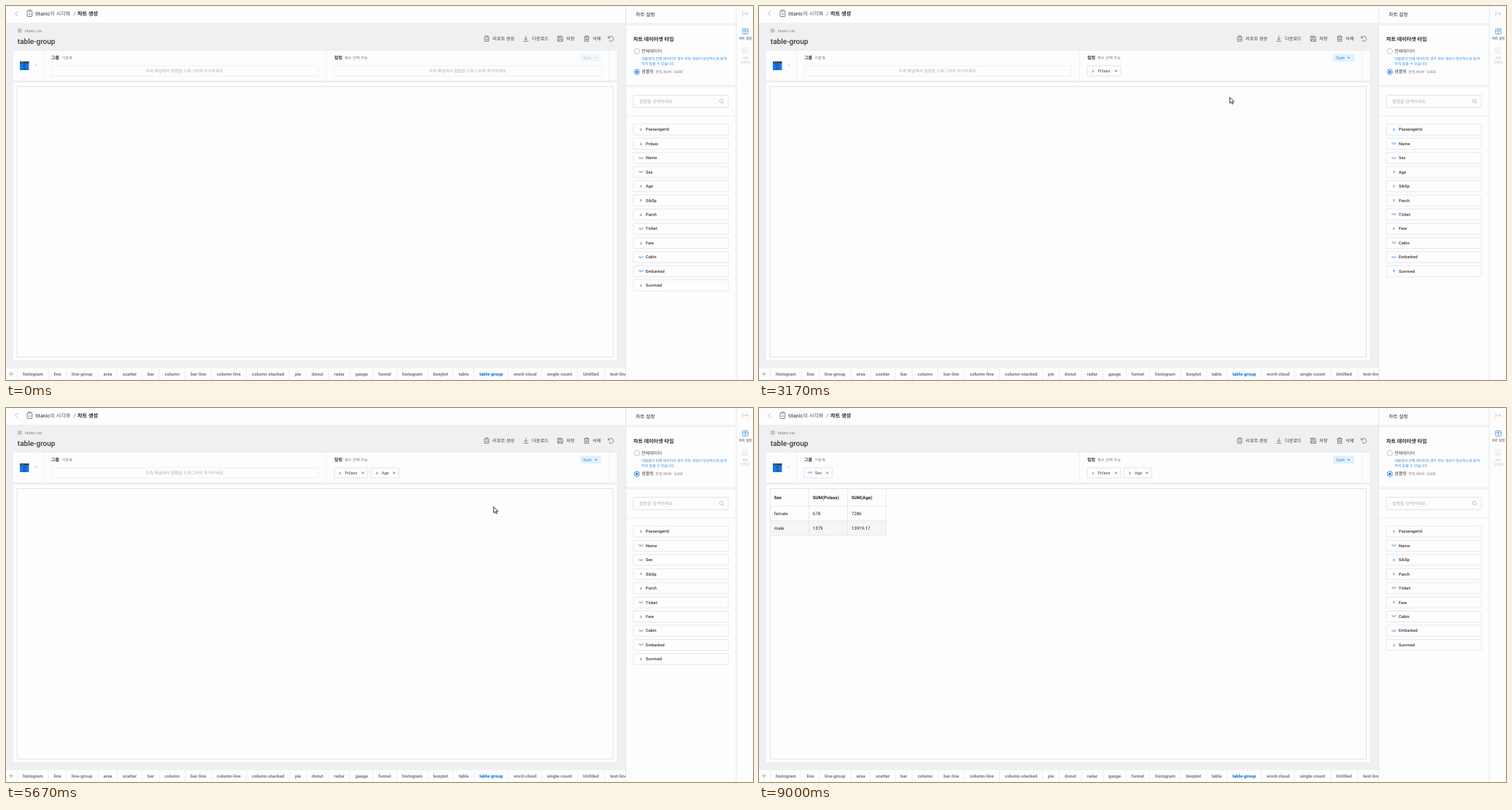
Animation of 1024 by 513 pixels, one loop 9.81 s. Source, as an HTML page:

```html
<!DOCTYPE html>
<html lang="ko">
<head>
<meta charset="utf-8">
<title>Chart builder</title>
<style>
  html, body { margin: 0; width: 100%; height: 100%; overflow: hidden; background: #fdfdfe; }
  svg { display: block; width: 100vw; height: 100vh; }
  text { font-family: Roboto, "Noto Sans CJK KR", "Noto Sans CJK", sans-serif; text-rendering: geometricPrecision; white-space: pre; }
</style>
</head>
<body>
<svg id="stage" viewBox="0 0 1024 513">
  <defs>
    <clipPath id="tabClip"><rect x="0" y="496" width="849" height="17"/></clipPath>
    <filter id="soft" x="-10%" y="-50%" width="120%" height="220%"><feGaussianBlur stdDeviation="1.3"/></filter>
  </defs>
  <g id="base"></g>
  <g id="state"></g>
  <g id="ghost"></g>
  <g id="arrow"><path d="M0 0V8.2L1.9 6.5 3.3 9.4 4.8 8.7 3.5 5.9H6.1Z" fill="#fff" stroke="#222" stroke-width=".9" stroke-linejoin="round"/></g>
  <g id="hand"><path d="M-3 1.6C-4 .4-3.6-.8-2.4-.6-2.5-2.4-1.2-2.8-.6-2.3 0-3 1-2.9 1.4-2.2 2.3-2.4 3.2-1.8 3.2-.6V.8L2.4 2.5H-2Z" fill="#fff" stroke="#222" stroke-width=".9" stroke-linejoin="round"/></g>
</svg>
<script>
const LOOP = 9810, BLUE = '#2a86db', LINE = '#e6e8ea', INK = '#3a3a3a', PAGE = '#eef0f2';
const $ = id => document.getElementById(id);

// Shape helpers; text is placed by its vertical centre.
const text = (x, cy, s, size, fill = INK, weight = 400, anchor = 'start') =>
  `<text x="${x}" y="${cy + size * .36}" font-size="${size}" fill="${fill}" font-weight="${weight}" text-anchor="${anchor}">${s}</text>`;
const rect = (x, y, w, h, fill = 'none', stroke = 'none', r = 0, sw = .7) =>
  `<rect x="${x}" y="${y}" width="${w}" height="${h}" rx="${r}" fill="${fill}" stroke="${stroke}" stroke-width="${sw}"/>`;
const path = (d, stroke = '#555', w = .8, fill = 'none') =>
  `<path d="${d}" fill="${fill}" stroke="${stroke}" stroke-width="${w}"/>`;
const at = (x, y, body) => `<g transform="translate(${x} ${y})">${body}</g>`;

const columns = [['PassengerId', 0], ['Pclass', 0], ['Name', 1], ['Sex', 1], ['Age', 0], ['SibSp', 0],
  ['Parch', 0], ['Ticket', 1], ['Fare', 0], ['Cabin', 1], ['Embarked', 1], ['Survived', 0]];
const tabs = [['histogram', 23], ['line', 65.5], ['line-group', 90], ['area', 133.5], ['scatter', 160], ['bar', 194],
  ['column', 217.5], ['bar-line', 253], ['column-line', 289], ['column-stacked', 337], ['pie', 396], ['donut', 419],
  ['radar', 449.5], ['gauge', 479], ['funnel', 510.5], ['histogram', 543], ['boxplot', 585.5], ['table', 620.5],
  ['table-group', 649], ['word-cloud', 696], ['single-count', 741.5], ['Untitled', 791], ['test-line', 828]];

const typeMark = (x, cy, isText) => isText
  ? text(x, cy, 'TXT', 3.5, BLUE, 700, 'middle')
  : text(x, cy, '3', 4.6, BLUE, 700, 'middle');

function drawBase() {
  let s = rect(0, 0, 1024, 513, '#fdfdfe') + rect(0, 23, 849, 473, PAGE);
  // breadcrumb
  s += path('M16 7L12.8 10.4 16 13.8', '#999', .7);
  s += rect(29, 6.5, 6.8, 8, 'none', '#666', .8, .8) + rect(30.8, 5.3, 3.2, 2, '#fdfdfe', '#666', .3) + path('M31 12V10.8M32.5 12V9.6M34 12V10.4', '#666', .6);
  s += text(40.3, 10.3, 'titanic의 시각화', 7.17, '#555', 500) + text(92.3, 10.3, '/', 7.17, '#666') + text(98, 10.3, '차트 생성', 7.17, '#222', 700);
  // heading
  s += rect(16.5, 31.5, 4.6, 4.6, 'none', '#999', .4, .6) + path('M16.5 33.1H21.1M16.5 34.6H21.1M18.7 31.5V36', '#999', .5);
  s += text(26, 34, 'titanic.csv', 5.2, '#777') + text(15.8, 48.2, 'table-group', 10.05, INK, 500);
  // toolbar
  s += rect(656, 42, 5.8, 6.4, 'none', '#555', .5, .7) + rect(657.4, 40.8, 3, 1.8, PAGE, '#555', .2, .6) + path('M657.5 46.8V45.5M659 46.8V44.2M660.4 46.8V45', '#555', .6);
  s += path('M712.7 41V46.5M710.2 44.2L712.7 46.7 715.2 44.2M709.3 48.3H716.1', '#555', .7);
  s += path('M756.4 41.4H761.8L763.2 42.8V48.3H756.4ZM758 41.4V43.5H761V41.4M757.8 48.3V45.6H761.8V48.3', '#555', .7);
  s += path('M792.3 42.3H799.5M794.4 42.2V41H797.4V42.2M793.3 42.4V48.4H798.5V42.4M795 44V47M796.8 44V47', '#555', .7);
  s += path('M826.2 43.5A3.4 3.4 0 1 1 826.5 47M825.7 41.2V44H828.5', '#555', .7);
  [[667, '리포트 생성'], [721, '다운로드'], [768, '저장'], [804, '삭제']].forEach(([x, w]) => s += text(x, 44.8, w, 6.2, INK, 500));
  // drop panel
  s += rect(9, 61, 829, 41.5, '#fdfdfe', LINE, 0, .6) + path('M51.5 61V102M439.2 61V102M827 61V102', LINE, .7);
  s += rect(19, 76, 12.4, 12, '#0f78f4') + rect(19, 76, 12.4, 2.8, '#3a4654');
  s += '<path d="M20.3 77.4H24" stroke="#9fb0c2" stroke-width=".7" stroke-dasharray=".8 .6"/>';
  s += path('M27.4 81.9V80.9H23.4L25.6 83.5 23.4 86.1H27.4V85.1', '#4a3a44', .9);
  s += '<path d="M39.4 80.6H42.4L40.9 82.3Z" fill="#bbb"/>';
  s += text(62, 71, '그룹', 6, INK, 700) + text(76.6, 71, '기준축', 5.2, '#777') + text(450, 71, '컬럼', 6, INK, 700) + text(464, 71, '복수 선택 가능', 5.3, '#777');
  // chart area
  s += rect(9, 104.5, 829, 382, '#fdfdfe', LINE, 0, .6) + rect(15.2, 110.4, 817.2, 371, 'none', '#e0dfe1', 0, .9);
  // tabs
  s += rect(0, 496, 849, 17, '#fdfdfe') + path('M0 496.3H849', LINE, .6) + path('M4 504.6H10.2M7.1 501.5V507.7', '#999', .7) + '<g clip-path="url(#tabClip)">';
  tabs.forEach(([name, x]) => {
    s += path(`M${x - 7.4} 497V513`, LINE, .7) + text(x, 504.7, name, 6.14, name === 'table-group' ? '#0a6fdc' : '#777', 700);
  });
  s += '</g>';
  // settings panel
  s += rect(849.5, 0, 151.5, 513, '#fdfdfe') + path('M849.5 0V513M1001 0V513', '#e0e3e6', .9);
  s += rect(850, 23.4, 151, 3, '#f0f1f3') + rect(850, 108.5, 151, 3, '#f0f1f3') + path('M850 151H1000', LINE, .7);
  s += text(863.3, 12, '차트 설정', 6.67, '#222', 500) + text(860, 45.4, '차트 데이터셋 타입', 7.05, '#222', 700);
  s += `<circle cx="864.8" cy="62" r="3.7" fill="#fff" stroke="#aaa" stroke-width=".7"/><circle cx="864.8" cy="90.4" r="3.6" fill="#fff" stroke="${BLUE}" stroke-width=".9"/><circle cx="864.8" cy="90.4" r="1.9" fill="${BLUE}"/>`;
  s += text(871, 61.8, '전체데이터', 6.1, '#444') + text(871, 90.2, '샘플링', 6.15, '#444') + text(890.3, 90.4, '한정, ROW : 5,000', 4.85, '#777');
  s += text(871.3, 72, '대용량의 전체 데이터의 경우 차트 생성이 정상적으로 동작', 4.92, '#2a88e2') + text(871.3, 79, '하지 않을 수 있습니다.', 4.95, '#2a88e2');
  s += rect(860, 122.4, 130, 17, '#fdfdfe', '#dadcdf', 1, .8) + text(868, 130.8, '컬럼을 검색하세요.', 5.98, '#b0b0b0');
  s += '<circle cx="980.6" cy="130.4" r="2.4" fill="none" stroke="#aaa" stroke-width=".7"/>' + path('M982.4 132.2L984.3 134.1', '#aaa', .7);
  // side rail
  s += path('M1010 7V13.6M1011.3 10.3H1017.2M1014.8 8L1017.2 10.3 1014.8 12.6', '#bbb', .7);
  s += rect(1009.7, 31.2, 7.4, 7.2, 'none', '#4a97df', .5, .8) + path('M1009.7 34H1017.1M1013.4 31.2V38.4', '#4a97df', .8) + text(1013.6, 44.6, '차트 설정', 4.55, INK, 500, 'middle');
  s += path('M1010 56.8V64.4H1017.4M1012 63V60.5M1014 63V59M1016 63V61M1012 58.5L1014 57 1016.8 57.6', '#d4d4d6', .7);
  s += text(1013.6, 71.3, '차트', 4.5, '#bbb', 400, 'middle') + text(1013.6, 77.6, '디자인', 4.5, '#bbb', 400, 'middle');
  $('base').innerHTML = s;
}

const cardShadow = '<rect x="1" y="5" width="128" height="11.5" fill="#9aa5b0" opacity=".25" filter="url(#soft)"/>';

// One field card, its top left corner at 0,0.
function card([name, isText], active) {
  return rect(0, 0, 130.3, 15, '#fdfdfe', active ? '#66a8e2' : '#e3e4e7', 1, active ? .9 : .8)
    + typeMark(10.5, 7.5, isText) + text(17.2, 7.4, name, 5.68, INK, 500)
    + (active ? '<path d="M120.6 5V11M122.4 5V11" stroke="#dcdee0" stroke-width=".7" stroke-dasharray=".8 1.2"/>' : '');
}

const tag = (x, w, name, isText) => rect(x, 82, w, 14, '#fdfdfe', '#dadcdf', 1, .8) + typeMark(x + 7.7, 89, isText)
  + text(x + 14.5, 88.9, name, 5.68, '#444') + at(x + w - 6.7, 89, path('M-1.3 -1.3L1.3 1.3M1.3 -1.3L-1.3 1.3', '#444', .7));

const emptyZone = (x, w) => rect(x, 82, w, 14, 'none', '#ebecee', 1, .8)
  + text(x + w / 2, 88.9, '우측 패널에서 컬럼을 드래그하여 추가하세요.', 5.75, '#b0b0b0', 400, 'middle');

function table() {
  const rows = [['Sex', 'SUM(Pclass)', 'SUM(Age)'], ['female', '678', '7286'], ['male', '1379', '13919.17']];
  let s = rect(15.5, 155, 159, 20, '#f5f5f7') + path('M15.5 134.5H174.5M15.5 154.6H174.5M15.5 175H174.5M15.5 110.5H174.5', '#e2e3e5', .7)
    + path('M68.5 110.5V175M121.5 110.5V175M174.5 110.5V175', '#e2e3e5', .7);
  rows.forEach((cells, r) => cells.forEach((c, i) =>
    s += text(20.8 + 53 * i, [122.4, 144.6, 164.6][r], c, 6.14, '#222', r ? 400 : 700)));
  return s;
}

// Drags: field, start, drop, grab offset; hovers: row, from, to.
const drags = [['Pclass', 1680, 2630, 13, 10], ['Age', 4130, 5100, 10, 7], ['Sex', 6520, 7430, 8, 7]];
const hovers = [[1, 1480, 2670], [3, 3590, 5130], [2, 6090, 7880]];
const handTimes = [[1680, 2670], [4130, 5130], [6520, 7880]];
const track = [[570, 700, 290], [1000, 770, 232], [1530, 873, 191], [1650, 873, 191], [2200, 590, 98], [2530, 540, 90],
  [2670, 540, 90], [3170, 645, 125], [3600, 862, 227], [3870, 870, 228], [4120, 870, 228], [4570, 492, 96], [4630, 492, 96],
  [5070, 500, 89], [5130, 500, 89], [5670, 668, 135.5], [6070, 848, 200], [6300, 868, 208], [6500, 868, 208],
  [6830, 394, 120], [7130, 213, 84], [9810, 213, 84]];
const LAG = 42;

// Monotone cubic through the track points.
function along(t, axis) {
  const n = track.length;
  t = Math.max(track[0][0], Math.min(t, track[n - 1][0]));
  let i = 0;
  while (i < n - 2 && t >= track[i + 1][0]) i++;
  const step = k => k < 0 || k >= n - 1 ? 0 : (track[k + 1][axis] - track[k][axis]) / (track[k + 1][0] - track[k][0]);
  const slope = k => {
    const a = step(k - 1), b = step(k);
    return a * b <= 0 ? 0 : 2 * a * b / (a + b);
  };
  const h = track[i + 1][0] - track[i][0], u = (t - track[i][0]) / h, v = 1 - u;
  return track[i][axis] * v * v * (1 + 2 * u) + track[i + 1][axis] * u * u * (3 - 2 * u)
    + h * u * v * (slope(i) * v - slope(i + 1) * u);
}

function drawState(drops, hover) {
  const used = drags.slice(0, drops).map(d => d[0]);
  let s = drops > 2 ? tag(62.3, 38, 'Sex', 1) + table() : emptyZone(62.3, 366);
  s += drops ? tag(450, 46, 'Pclass', 0) : emptyZone(450, 366.5);
  if (drops > 1) s += tag(500.5, 38, 'Age', 0);
  s += `<g opacity="${drops ? 1 : .4}">${rect(787, 66, 29, 10, '#dff0fd', 'none', 1)}${text(791.3, 71, 'Sum', 5.65, BLUE)}<path d="M806.8 70.2H810.2L808.5 72.2Z" fill="${BLUE}"/></g>`;
  columns.filter(c => !used.includes(c[0])).forEach((c, i) =>
    s += at(859.9, 162 + 19.43 * i, (i === hover ? cardShadow : '') + card(c, i === hover)));
  $('state').innerHTML = s;
}

const between = (t, a, b) => t >= a && t < b;
const place = (id, x, y, opacity) => {
  $(id).setAttribute('transform', `translate(${x} ${y})`);
  $(id).setAttribute('opacity', opacity);
};
let stateKey, ghostName;

function render(t) {
  const drops = drags.filter(d => t >= d[2]).length;
  const hover = (hovers.find(h => between(t, h[1], h[2])) || [-1])[0];
  if (stateKey !== drops + '/' + hover) {
    stateKey = drops + '/' + hover;
    drawState(drops, hover);
  }
  const drag = drags.find(d => between(t, d[1], d[2]));
  if (drag) {
    if (ghostName !== drag[0]) {
      ghostName = drag[0];
      $('ghost').innerHTML = card(columns.find(c => c[0] === ghostName), true);
    }
    place('ghost', along(t - LAG, 1) - drag[3], along(t - LAG, 2) - drag[4], .8);
  } else place('ghost', 0, 0, 0);
  const x = along(t, 1), y = along(t, 2);
  const shown = t < 570 ? 0 : Math.min(1, (t - 570) / 80, Math.max(0, (9000 - t) / 130));
  const holding = handTimes.some(h => between(t, h[0], h[1]));
  place('arrow', x, y, holding ? 0 : shown);
  place('hand', x, y, holding ? shown : 0);
}

drawBase();
const start = performance.now();
(function tick() {
  render((performance.now() - start) % LOOP);
  requestAnimationFrame(tick);
})();
</script>
</body>
</html>
```
